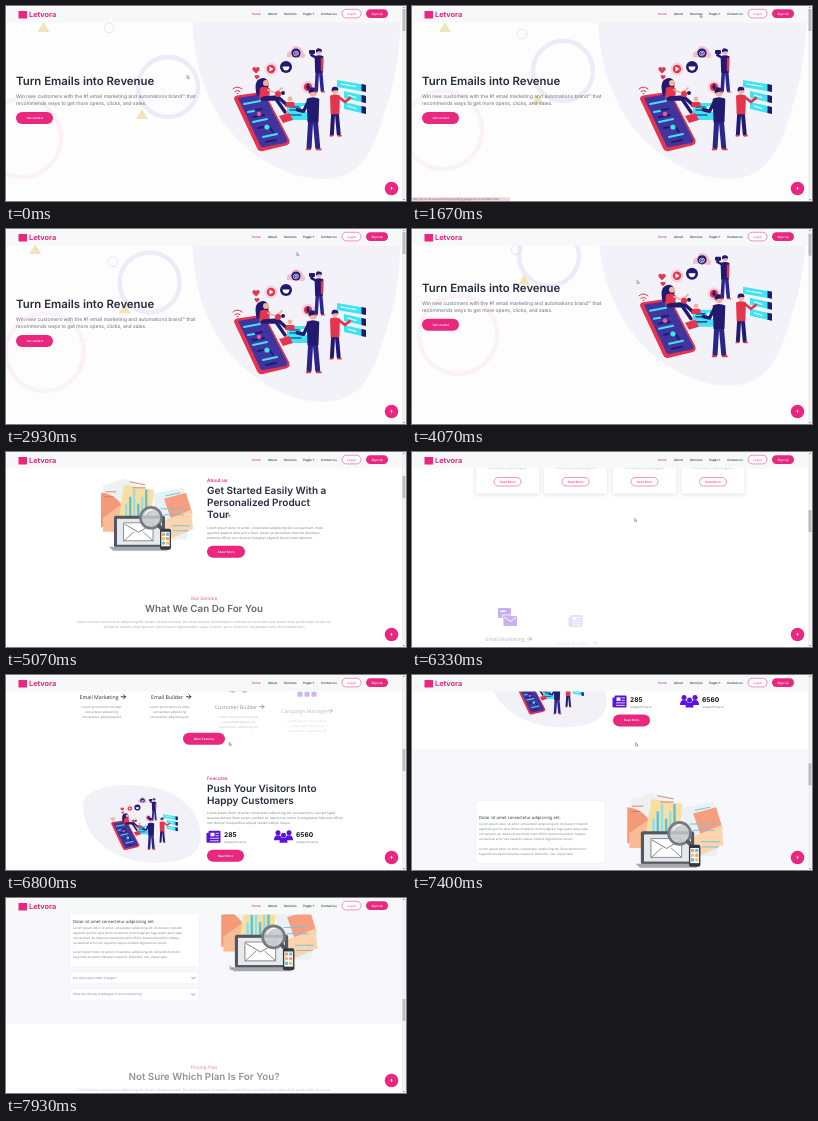
Write an HTML page that moves like this. It is 400x195 px and loops after 8000 ms.

```html
<!DOCTYPE html>
<html lang="en">
<head>
<meta charset="utf-8">
<title>Email marketing page</title>
<style>
  html, body { margin: 0; height: 100%; overflow: hidden; background: #fff; }
  svg { display: block; width: 100vw; height: 100vh; }
  text { font-family: Inter, sans-serif; text-rendering: geometricPrecision; }
  .body { font-family: "Open Sans", sans-serif; }
  .card { filter: drop-shadow(0 1px 2px #0002); }
</style>
</head>
<body>
<svg id="stage" viewBox="0 0 400 195"></svg>
<script>
const PINK = '#e9277e', PURPLE = '#5a12dc', INK = '#252b3d', GREY = '#777b84';
const RED = '#e5344d', NAVY = '#211a70', CYAN = '#3fe3f2', SKIN = '#f3b19f';
const LOOP = 8000;
const COLUMNS = [95.5, 163.5, 232.5, 301];

// ---- drawing helpers ----
const group = (x, y, content, scale = 1) =>
  `<g transform="translate(${x} ${y}) scale(${scale})">${content}</g>`;
const rect = (x, y, w, h, fill, r = 0, extra = '') =>
  `<rect x="${x}" y="${y}" width="${w}" height="${h}" rx="${r}" fill="${fill}" ${extra}/>`;
const circle = (x, y, r, fill, extra = '') =>
  `<circle cx="${x}" cy="${y}" r="${r}" fill="${fill}" ${extra}/>`;
const path = (d, fill, extra = '') => `<path d="${d}" fill="${fill}" ${extra}/>`;
const line = (d, color, width = 1) =>
  path(d, 'none', `stroke="${color}" stroke-width="${width}" stroke-linecap="round" stroke-linejoin="round"`);
// y is the middle of the line of text
const text = (x, y, str, size, fill = INK, weight = 400, anchor = 'start', cls = '') =>
  `<text x="${x}" y="${y + size * .36}" font-size="${size}" fill="${fill}" font-weight="${weight}" text-anchor="${anchor}" class="${cls}">${str}</text>`;
const para = (x, y, lines, anchor = 'start', step = 4.9, size = 3.1) =>
  lines.map((s, i) => text(x, y + i * step, s, size, GREY, 400, anchor, 'body')).join('');
const pill = (x, y, w, h, label, size = 3) =>
  rect(x, y, w, h, PINK, h / 2) + text(x + w / 2, y + h / 2, label, size, '#fff', 500, 'middle');
const outlinePill = (x, y, w, h, label) =>
  rect(x, y, w, h, '#fff', h / 2, `stroke="${PINK}" stroke-width=".5"`) +
  text(x + w / 2, y + h / 2, label, 3, PINK, 400, 'middle');
// fades in from `start` while rising by `rise`
const reveal = (start, rise, content) =>
  `<g class="reveal" data-start="${start}" data-rise="${rise}">${content}</g>`;

// ---- icons, centred on 0,0 ----
const envelope = (x, y, w, h, fill, fold = '#fff') =>
  rect(x, y, w, h, fill, 1) + line(`M${x + 1} ${y + 1.5}l${w / 2 - 1} ${h / 2 - 1}l${w / 2 - 1} ${1 - h / 2}`, fold, .9);
const icons = {
  mails: rect(-9.5, -9, 13, 10, PURPLE, 1) + rect(-7, -6.5, 5, 1.5, '#fff') +
    envelope(-4, -1, 13.5, 10, PURPLE) + line('M-5 9V-2H9', '#fff', .8),
  thumb: rect(-9, -1, 4, 10, PURPLE, 1) +
    path('M-4 0C-1 -2 0 -5 0 -8C3 -10 5 -6 3 -3H8C10 -2 9 0 8 1C9 3 8 4 7 5C7 8 5 8 3 8C0 8 -2 7 -4 6Z', PURPLE),
  train: rect(-7.5, -9, 15, 15, PURPLE, 4) + rect(-5, -6, 4.3, 5, '#fff') + rect(.7, -6, 4.3, 5, '#fff') +
    circle(-4, 2, 1.4, '#fff') + circle(4, 2, 1.4, '#fff') + line('M-4 6L-6 9M4 6L6 9', PURPLE, 1.6),
  tree: rect(-3, -8, 6, 5, PURPLE, .7) + line('M0 -3V3M-7 3V0H7V3', PURPLE, 1.2) +
    [-9.5, -2.5, 4.5].map(x => rect(x, 3, 5, 5, PURPLE, .7)).join(''),
  news: rect(-5, -6, 12, 12, PURPLE, 1) + rect(-7, -4, 2.5, 10, PURPLE, 1) + rect(-3, -4, 4, 3.5, '#fff') +
    line('M2.5 -3.5H5M2.5 -1H5M-3 1.5H5M-3 4H5', '#fff', .8),
  users: [[-5.5, -2.5], [5.5, -2.5], [0, 0]].map(([x, y]) =>
    circle(x, y - 1.5, 2.5, PURPLE) + path(`M${x - 4} ${y + 6}q0 -5 4 -5t4 5z`, PURPLE)).join(''),
  cubes: [[0, -6], [-6, 3], [6, 3]].map(([x, y]) =>
    path(`M${x - 4.5} ${y - 2}l4.5 -2l4.5 2v5l-4.5 2l-4.5 -2z`, PURPLE)).join('')
};

// ---- illustrations ----
const person = (x, y, scale, shirt, trousers, arm) => group(x, y,
  line('M-1.5 17L-2.5 34M1.5 17L3 34', trousers, 3.2) +
  path('M-4 3Q0 1 4 3L3.5 18H-3.5Z', shirt) + line(arm, shirt, 2.2) +
  circle(0, -.8, 2.4, SKIN) + path('M-2.7 -.5Q-3.2 -4.5 0 -4.2T2.7 -1.2Q0 -2 -2.7 -.5Z', NAVY) +
  line('M-4 35.3h2M2.5 35.3h2.5', RED, 1.2), scale);
const heart = (x, y, scale) =>
  group(x, y, path('M0 3.5L-3.5 0Q-4 -3 -1.5 -3Q0 -3 0 -1Q0 -3 1.5 -3Q4 -3 3.5 0Z', RED), scale);

const crew =
  // phone
  path('M228 93Q228 90 231 89.5L255 86Q258 86 260 89L283 133Q285 138 280 139.5L257 145Q253 146 251 142Z', RED) +
  path('M232 92L256 88Q258 88 259 90L281 133Q282 136 279 137L258 141Q255 142 254 139Z', '#41349f') +
  line('M238 98l16 -3M242 106l6 -1M247 116l14 -3M257 131l14 -3', CYAN, 2) +
  line('M250 104l6 -1M247 111l11 -2M252 122l5 -1M262 119l5 7M260 136l10 -2', NAVY, 2) +
  circle(261, 121, 2.6, CYAN) + circle(253, 108, 2.2, '#e85aa0') +
  // seated woman
  path('M251 90Q246 72 258 72Q264 73 262 84Z', NAVY) + circle(260, 77, 3, SKIN) +
  path('M254 82Q259 79 264 83L263 94H253Z', RED) + line('M256 93L270 93L279 106M258 92L272 91L283 101', NAVY, 3.4) +
  line('M262 84L270 87L276 82', SKIN, 1.8) + circle(272, 88, 3, RED) + circle(277, 87, 2, NAVY) +
  line('M227 83q4 -4 9 0M229 85.5q2.5 -2 5 0', RED, 1) + circle(231.5, 87.5, .8, RED) +
  // chat cards
  circle(302, 81, 6.5, '#f6d3e2') + circle(302, 81, 4, RED) + path('M302 77l2 4l-2 3l-2 -3z', NAVY) +
  rect(281, 97, 22, 17, CYAN, 1) + line('M284 101h9M284 104h6M284 109h11', NAVY, 1.2) + rect(295, 100, 6, 6, '#fff') +
  path('M273 110l10 -3l4 7l-10 3z', RED) + circle(284, 93, 2.4, SKIN) +
  path('M280 96h8l1 5h-10z', RED) +
  person(307, 88, 1.57, NAVY, '#2c2487', 'M-3 5L-6 11L-10 10') +
  person(313, 47, 1.1, NAVY, '#2d258e', 'M-3 4L-7 2L-5 -1') + rect(303, 44, 6, 4, NAVY, 1) +
  line('M316 53v11', RED, 2.4) +
  // wall panels
  [[331, 74], [338, 85], [338, 96]].map(([x, y]) =>
    path(`M${x} ${y}L360 ${y + 5}v7L${x} ${y + 7}z`, CYAN) + path(`M355.5 ${y + 4}l4.5 1v7l-4.5 -1z`, NAVY) +
    line(`M${x + 4} ${y + 4}L350 ${y + 6.5}`, '#fff', 1)).join('') +
  person(329, 86, 1.24, RED, NAVY, 'M3 4L8 8L12 5') +
  // bubbles
  path('M281 51Q280 45 285 45Q287 38 293 41Q297 43 297 46Q301 48 298 52Z', '#f3bfd0') +
  circle(290, 47, 4.6, NAVY) + text(290, 47, '@', 6, '#fff', 600, 'middle') +
  circle(265, 63, 6.5, '#f6d3e2') + circle(265, 63, 4.2, RED) + path('M263.5 60.5l4 2.5l-4 2.5z', '#fff') +
  circle(280, 61, 6, NAVY) + path('M276.5 60.5h7q-.5 4 -3.5 4t-3.5 -4z', '#fff') +
  heart(250, 64, 1) + heart(251, 71, .7);

const desk =
  path('M97 34L119 27L130 32L124 80H97Z', '#eef1f2') +
  path('M95 41A25 25 0 0 1 119 65L95 76Z', '#f59a78') + path('M97 66L119 50V80H97Z', '#f8bd94') +
  path('M118 33L148 38L144 72H112Z', '#f7dfa3') +
  [0, 1, 2, 3, 4, 5].map(i => rect(119 + i * 4, 52 - i % 3 * 7, 2.4, 30, i % 2 ? '#59c4df' : '#8fe0ea')).join('') +
  line('M124 30l15 3M127 36h12M100 40h10M99 45h8', '#d96a62', .8) +
  path('M147 42L177 36L187 62L180 88H150Z', '#e9f1f4') +
  path('M158 47L180 41L186 61L166 70Z', '#f79d80') + path('M146 74L185 58L187 77L160 89Z', '#ffd3ad') +
  line('M160 44l14 -3M155 57h23M158 63h20M166 74h17M167 79h15', '#6ec7dc', 1) +
  rect(108, 64, 51, 32, '#53575f', 2) + rect(111, 67, 45, 26, '#e7eaec') +
  envelope(118, 71, 29, 18, '#fff', '#777') + line('M118 71h29v18h-29zM118 89l10 -9M147 89l-10 -9', '#777', .8) +
  path('M103 95H165L161 99H107Z', '#a4a9af') +
  circle(145, 66, 10.5, '#c3cace', 'fill-opacity=".85" stroke="#777c82" stroke-width="2.6"') +
  line('M153 74L163 84', '#555a61', 4) + line('M139 63q2 -5 7 -5', '#fff', 1.2) +
  rect(154, 77, 11, 21, '#333841', 2) + rect(155.3, 80, 8.4, 14.5, '#fff') +
  [0, 1, 2, 3, 4, 5].map(i => rect(156 + i % 2 * 4, 81 + (i >> 1) * 4.4, 3, 3, ['#f59a78', '#59c4df', '#f4c44f'][i % 3])).join('');

// ---- page sections, each in the coordinates of the view that shows it ----
const triangle = path('M0 -5L6 5H-6Z', '#eee5bb');
const hero =
  rect(0, 0, 400, 200, '#fdfdfe') +
  path('M187 0C184 45 196 85 217 116C240 148 280 173 316 173C350 173 364 152 375 118C386 84 396 50 394 0Z', '#f3f2f9') +
  '<g id="bigRing">' + circle(0, 0, 30, 'none', 'stroke="#eeebf9" stroke-width="4.5"') + '</g>' +
  '<g id="dottedRing">' + circle(0, 0, 39, 'none', 'stroke="#f9ebf1" stroke-width="4.5" stroke-dasharray="1.2 .8"') + '</g>' +
  '<g id="smallRing">' + circle(0, 0, 4.8, 'none', 'stroke="#f7dce8" stroke-width=".9"') + '</g>' +
  `<g id="topTriangle">${triangle}</g><g id="lowTriangle">${triangle}</g>` +
  text(10, 75, 'Turn Emails into Revenue', 11.4, INK, 600) +
  text(10, 90, 'Win new customers with the #1 email marketing and automations brand™ that', 4.94, '#6b6f78') +
  text(10, 97.3, 'recommends ways to get more opens, clicks, and sales.', 4.94, '#6b6f78') +
  pill(10, 106, 37, 12, 'Get started') +
  `<g id="crew">${crew}</g>`;

const about =
  reveal(4150, 0, desk + text(201, 29, 'About us', 4.7, PINK, 600) +
    ['Get Started Easily With a', 'Personalized Product', 'Tour'].map((s, i) => text(201, 39 + i * 12, s, 10, INK, 600)).join('') +
    para(201, 76, ['Lorem ipsum dolor sit amet, consectetur adipisicing elit. Accusantium, modi',
      'quaerat quaerat dicta porro illum, autem, praesentium maiores doloribus',
      'tempora officiis cum dolores! Voluptas eligendi ipsum amet laborum.'], 'start', 4.9, 3.3) +
    pill(201, 94, 38, 12, 'About More')) +
  reveal(4790, 0, text(198, 147, 'Our Service', 4.7, PINK, 500, 'middle') +
    text(198, 157, 'What We Can Do For You', 9.8, INK, 600, 'middle') +
    para(198, 170, ['Dolor sit amet consectetur, adipisicing elit. Ipsam, beatae maxime. Nisi enim eveniet doloremque commodi sint provident quo rerum illum perferendis rerum est',
      'architecto dolores cilate quis eos ipsum quam reprehenderit culpa corporis, porro distinctio. Voluptates nemo doloremque cum'], 'middle', 4.9, 3.4));

const services = [['Email Newsletters', 'mails'], ['Acquistion Emails', 'thumb'], ['Retention Emails', 'train'], ['Promotional Emails', 'tree']];
const blurb = ['Lorem ipsum dolor sit amet', 'consectetur adipisicing', 'consectetur, adipisicing elit'];
const card = ([title, icon], x, hovered) =>
  rect(x - 31.5, 36, 63, 86, hovered ? '#eee7fc' : '#fff', 1.5, 'class="card"') +
  rect(x - 10.5, 42, 21, 23, '#fff') + group(x, 54, icons[icon]) +
  text(x, 76, title, 5.2, INK, 500, 'middle', 'body') + para(x, 87, blurb, 'middle') +
  outlinePill(x - 13.5, 106, 27, 8.5, 'Read More');
const columnDelay = [0, 80, 400, 480];
const cards =
  services.map((s, i) => reveal(4970 + columnDelay[i], 20, card(s, COLUMNS[i], i === 2))).join('') +
  group(0, 91, services.map((s, i) => reveal(5755, 20, card(s, COLUMNS[i], false))).join(''));

const featureList = [['Email Marketing', 'mails'], ['Email Builder', 'news'], ['Customer Builder', 'cubes'], ['Campaign Manager', 'tree']];
const feature = ([title, icon], x) =>
  group(x, 0, icons[icon]) + text(x - 2.5, 22, title, 5.2, INK, 500, 'middle', 'body') +
  line(`M${x + title.length * 1.38 - 1} 22h4.4m-2 -2l2 2l-2 2`, INK, .9) + para(x, 32, blurb, 'middle');
const features =
  featureList.map((f, i) => reveal(6200 + columnDelay[i], 20, feature(f, COLUMNS[i]))).join('') +
  pill(177, 58, 42, 12, 'More Features') +
  reveal(6200, 0,
    path('M77 135C73 113 110 108 138 111S190 130 194 154S182 188 150 188S81 172 77 135Z', '#f2f1f8') +
    group(-10, 102, '<use href="#crew"/>', .505) +
    text(201, 104, 'Feacutes', 4.7, PINK, 500) +
    text(201, 114, 'Push Your Visitors Into', 10, INK, 600) + text(201, 126, 'Happy Customers', 10, INK, 600) +
    para(201, 138.5, ['Lorem ipsum dolor sit amet consectetur adipisicing elit. Accusantium, suscipit fugiat',
      'quaerat dolores illum autem, quidem at. Asperiores nemo id voluptatum laborum officiis',
      'rem dolore! Voluptatibus aliquid veniam labore itaque.'], 'start', 4.8, 3.3) +
    group(207.5, 162, icons.news) + text(218, 160, '285', 6.6, '#111', 700) + text(218, 167.5, 'Created Projects', 2.8, GREY) +
    group(277.5, 162, icons.users) + text(290, 160, '6560', 6.6, '#111', 700) + text(290, 167.5, 'Created Projects', 2.8, GREY) +
    pill(201, 175, 37, 12, 'Read More'));

const faqRow = (y, label) =>
  rect(64, y - 6, 129, 12, '#fff', 1, 'stroke="#e9e9f0" stroke-width=".5"') +
  text(67, y, label, 3.1, GREY, 400, 'start', 'body') + line(`M185.5 ${y - .7}l1.7 1.7l1.7 -1.7`, '#555', .6);
const faq =
  rect(0, -45, 400, 171, '#f8f8fc') +
  rect(64, 6, 129, 63, '#fff', 1, 'stroke="#e9e9f0" stroke-width=".5"') +
  text(67, 23.5, 'Dolor sit amet consectetur adipisicing elit.', 4.2, INK, 500, 'start', 'body') +
  para(67, 30, ['Lorem ipsum dolor sit amet, consectetur adipisicing elit. Illo harum, impedit',
    'sapiente quo illo quia minus inventore modi magnam fuga quam quia culpa',
    'consectetur, ab deserunt exercitationem officiis maxime blanditiis. Neque,',
    'accusamus error eos sapiente neque incidunt dignissimos rerum.', '',
    'Lorem ipsum dolor sit amet, consectetur adipisicing elit. Dicta distinctio hic',
    'fuga odio excepturi delectus neque id. Distinctio, non. Aspernatur']) +
  faqRow(80, 'Are there any hidden charges?') + faqRow(96.5, 'What are the key challenges of email marketing?') +
  group(116, -30, desk, 1.045) +
  reveal(7730, 0, text(198, 169, 'Pricing Plan', 4.7, PINK, 500, 'middle') +
    text(198, 179, 'Not Sure Which Plan Is For You?', 9.8, INK, 600, 'middle') +
    para(198, 191.5, ['Dolor sit amet consectetur, adipisicing elit. Ipsam, beatae maxime. Nisi enim eveniet doloremque commodi sint provident quo rerum illum perferendis rerum est'], 'middle', 4.9, 3.4));

// ---- fixed window parts ----
const header =
  rect(0, 0, 396, 16.5, '#f7f8f8') + rect(12.5, 5, 8.5, 7.5, PINK) + text(23, 8.7, 'Letvora', 7.3, PINK, 700) +
  [[246, 'Home'], [262, 'About'], [278, 'Services'], [297, 'Pages'], [315, 'Contact us']].map(([x, s], i) =>
    text(x, 8, s, 3.05, i ? INK : PINK, 500)).join('') + path('M306.5 7.4h2l-1 1.2z', INK) +
  outlinePill(336, 3.3, 19, 8.6, 'Log in') + pill(360, 3.3, 22, 8.6, 'Sign Up');
const chrome =
  circle(385.5, 182.5, 6.8, PINK) + line('M385.5 183.6v-2.2M384.6 182.2l.9 -.9l.9 .9', '#fff', .7) +
  rect(396, 0, 4, 195, '#f1f1f1') + '<g id="thumb">' + rect(396.5, 0, 3, 22, '#bdbdbd') + '</g>' +
  path('M397 2l1 -1.2l1 1.2zM397 193l1 1.2l1 -1.2z', '#777') +
  '<g id="status">' + rect(0, 191.3, 98, 3.7, '#e9dadc') +
  text(1, 193, 'file:///C:/Users/user/Desktop/landing/page/services/index.html', 2.9, '#a8505c') + '</g>' +
  '<g id="cursor">' + path('M0 0V3.4L.8 2.7L1.4 4L2 3.7L1.4 2.4H2.5Z', '#fff', 'stroke="#555" stroke-width=".4"') + '</g>';

const stage = document.getElementById('stage');
stage.innerHTML = rect(0, 0, 400, 195, '#fff') +
  `<g id="page">${hero}${group(0, 200, about)}${group(0, 352, cards)}${group(0, 675, features)}${group(0, 930, faq)}</g>` +
  header + chrome;

// ---- motion: each track is a list of [time, ...values] ----
const scrollTrack = [[0, 0], [3980, 0], [4070, 16], [5070, 200], [5800, 352], [6800, 675], [7930, 930], [8000, 940]];
const movers = {
  cursor: [[0, 181, 69], [450, 190, 62], [1000, 250, 9], [1670, 288, 8], [2300, 318, 8], [2700, 322, 9], [3400, 227, 52],
    [4070, 225, 51], [5070, 222, 61], [5800, 222, 65], [6800, 223, 67], [8000, 224, 68]],
  bigRing: [[0, 162, 81], [1670, 151, 65], [4070, 137, 43], [8000, 116, 9]],
  dottedRing: [[0, 16, 132], [1670, 31, 124], [4070, 46, 122], [8000, 62, 118]],
  smallRing: [[0, 103, 22], [1670, 110, 28], [4070, 104, 37], [8000, 92, 46]],
  topTriangle: [[0, 37.5, 21], [1670, 33, 21], [4070, 26, 19], [8000, 16, 17]],
  lowTriangle: [[0, 136, 108], [1670, 126, 93], [4070, 112, 67], [8000, 92, 27]]
};
function sample(track, t) {
  const i = Math.max(1, track.findIndex(key => key[0] >= t));
  const [a, b] = [track[i - 1], track[i]];
  const k = (t - a[0]) / (b[0] - a[0]);
  return a.slice(1).map((v, j) => v + (b[j + 1] - v) * k);
}
const byId = id => document.getElementById(id);
const move = (el, x, y) => el.setAttribute('transform', `translate(${x} ${y})`);
const revealed = document.querySelectorAll('.reveal');

function draw(now) {
  const t = now % LOOP;
  const [scroll] = sample(scrollTrack, t);
  move(byId('page'), 0, -scroll);
  move(byId('thumb'), 0, 3 + scroll / 9.5);
  for (const id in movers) move(byId(id), ...sample(movers[id], t));
  byId('status').style.display = t > 1000 && t < 2750 ? '' : 'none';
  for (const el of revealed) {
    const { start, rise } = el.dataset;
    const progress = Math.min(1, Math.max(0, (t - start) / 400));
    el.setAttribute('opacity', progress);
    move(el, 0, rise * (1 - progress));
  }
  requestAnimationFrame(draw);
}
requestAnimationFrame(draw);
</script>
</body>
</html>
```
